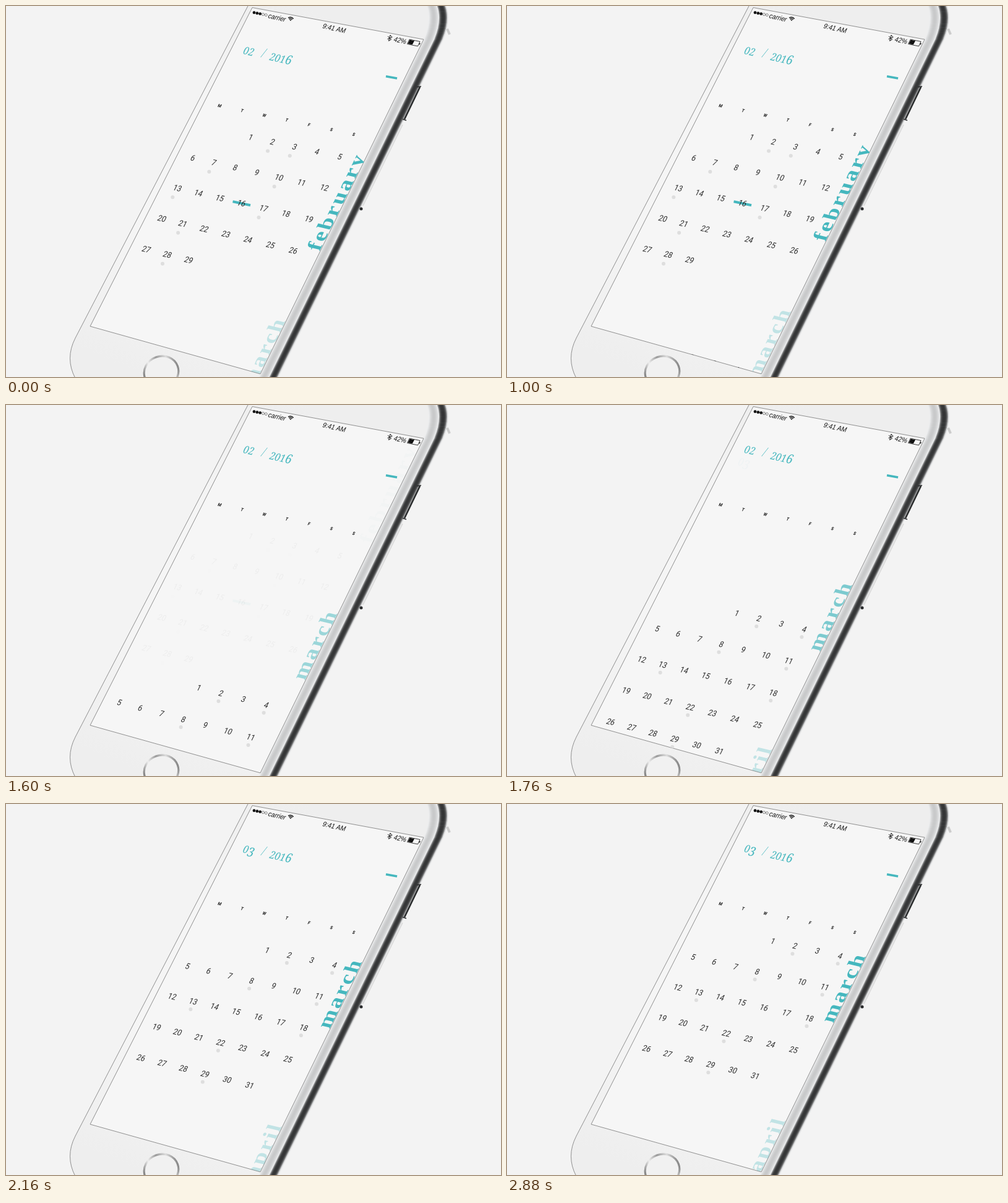
Recreate the animation shown at these times as an HTML page with a canvas. Size 800x600 px, loop 2920 ms.

```html
<!DOCTYPE html>
<html lang="en">
<head>
<meta charset="utf-8">
<title>Calendar</title>
<style>
html, body { margin: 0; width: 100%; height: 100%; overflow: hidden; background: #f3f3f3; }
canvas { display: block; }
</style>
</head>
<body>
<canvas id="stage" width="800" height="600"></canvas>
<script>
const ctx = document.getElementById('stage').getContext('2d');
const LOOP = 2920, TEAL = '#45b7be';
const SANS = 'Roboto, sans-serif', STATUS = '"Liberation Sans", Arial, sans-serif';
const SERIF = '"Liberation Serif", "Times New Roman", serif', NUMERALS = '"Noto Serif", serif';

const ramp = (t, start, end) => Math.min(1, Math.max(0, (t - start) / (end - start)));

// Like cubic-bezier(x1, 0, x2, 1) between two times.
function ease(t, start, end, x1, x2) {
  const x = ramp(t, start, end);
  let low = 0, high = 1, p = .5;
  for (let i = 0; i < 24; i++) {
    p = (low + high) / 2;
    const q = 1 - p;
    if (3 * q * q * p * x1 + 3 * q * p * p * x2 + p ** 3 < x) low = p;
    else high = p;
  }
  return p * p * (3 - 2 * p);
}

const edgeX = y => 675 - (y - 54) * .488;
const columnX = i => 33.6 * i + .3 * i * i;
const gridPoint = (u, row) =>
  [327.2 + u - 25.1 * row, 197 + 48.3 * row + .2 * row * row + u * (.219 + .008 * row)];

function paint(fill, stroke, width = 1) {
  if (fill) { ctx.fillStyle = fill; ctx.fill(); }
  if (stroke) { ctx.strokeStyle = stroke; ctx.lineWidth = width; ctx.stroke(); }
}
function shape(points, fill, stroke, width, close = true) {
  ctx.beginPath();
  points.forEach(p => ctx.lineTo(...p));
  if (close) ctx.closePath();
  paint(fill, stroke, width);
}
const line = (x1, y1, x2, y2, color, width) => shape([[x1, y1], [x2, y2]], null, color, width, false);
function disc(x, y, r, fill, stroke, width) {
  ctx.beginPath();
  ctx.arc(x, y, r, 0, 7);
  paint(fill, stroke, width);
}
function gradient(x1, y1, x2, y2, ...colors) {
  const g = ctx.createLinearGradient(x1, y1, x2, y2);
  colors.forEach((c, i) => g.addColorStop(i / (colors.length - 1), c));
  return g;
}
// Text lying in the plane of the screen.
function label(text, x, y, font, color, align = 'left') {
  ctx.save();
  ctx.transform(.82, .19, -.43, .88, x, y);
  ctx.font = font;
  ctx.fillStyle = color;
  ctx.textAlign = align;
  ctx.fillText(text, 0, 0);
  ctx.restore();
}
function faded(alpha, draw) {
  if (alpha <= 0) return;
  ctx.save();
  ctx.globalAlpha = Math.min(1, alpha);
  draw();
  ctx.restore();
}

function drawBody() {
  ctx.beginPath();
  ctx.moveTo(392, -2);
  ctx.lineTo(112, 537);
  ctx.quadraticCurveTo(95, 570, 112, 602);
  ctx.lineTo(434, 602);
  ctx.lineTo(702, 54);
  ctx.quadraticCurveTo(715, 20, 704, -2);
  paint(gradient(480, 0, 230, 600, '#eeeeee', '#f5f5f5', '#f5f5f5', '#eeeeee'), '#777', .8);

  // Metal side: a soft pale rim, then a dark band that brightens outwards.
  for (let offset = 1; offset < 32; offset++) {
    const shade = offset < 18
      ? 245 - 45 * Math.sin(Math.PI * offset / 18)
      : 52 + 170 * (Math.abs(offset - 24) / 7) ** 3;
    ctx.beginPath();
    ctx.moveTo(678 + offset, -4);
    ctx.quadraticCurveTo(689 + offset, 20, 675 + offset, 54);
    ctx.lineTo(edgeX(610) + offset, 610);
    paint(null, `rgb(${shade}, ${shade + 1}, ${shade + 2})`, 1.6);
  }
  line(713, 37, 717, 46, '#cccccc', 4);
  line(669, 131, 644, 183, '#292b2c', 2.6);
  line(664, 131, 671, 130, '#292b2c', 1.5);
  line(641, 183, 647, 185, '#292b2c', 1.5);
  line(641, 192, 577, 323, '#d8d8d8', 1.5);
  disc(574, 328, 2.5, '#292b2c');

  ctx.beginPath();
  ctx.ellipse(251, 592, 28, 25.5, -.35, 0, 7);
  paint('#f1f1f1', gradient(222, 600, 279, 578, '#777', '#eeeeee', '#999', '#dddddd', '#777'), 3.2);
}

function drawStatusBar() {
  for (let i = 0; i < 5; i++)
    disc(401 + i * 4.8, 10.7 + i * .95, i < 3 ? 2.4 : 2, i < 3 && '#111', i > 2 && '#333', .6);
  const font = '12px ' + STATUS;
  label('carrier', 422.5, 19, font, '#111');
  label('9:41 AM', 510.5, 35.5, font, '#111');
  label('42%', 625.5, 57, font, '#111');
  for (let r = 1.5; r < 7; r += 2.4) {
    ctx.beginPath();
    ctx.arc(459.5, 24.5, r, -2.15, -.65);
    paint(null, '#111', 1.5);
  }
  shape([[617, 49], [622.5, 54], [618.5, 56.5], [621, 47], [624, 50.5], [616.5, 53.5]],
    null, '#111', 1, false);
  shape([[652, 54], [669, 57.5], [665.5, 65], [648.5, 61.5]], null, '#222', .9);
  shape([[652.5, 54.8], [660, 56.3], [656.7, 62.6], [649.4, 61.1]], '#111');
  line(669.2, 60, 668, 62.5, '#222', 1.5);
}

// Old-style figures: 3 hangs below the line, 6 rises above the rest.
function oldStyle(text, x, y) {
  for (const ch of text) {
    const size = ch === '3' || ch === '6' ? 22 : 18, drop = ch === '3' ? 4 : 0;
    label(ch, x - drop * .43, y + drop * .88, size + 'px ' + NUMERALS, TEAL);
    x += size * .56 * .82;
    y += size * .56 * .19;
  }
}

function drawHeader(t) {
  const rolled = ease(t, 1700, 2280, .6, .4), ahead = 1 - rolled;
  faded(1 - rolled * 2.2, () => oldStyle('02', 381.5 + rolled * 10, 77 - rolled * 20));
  faded(rolled * 3.2, () => oldStyle('03', 381.5 - ahead * 10, 77 + ahead * 20));
  line(411.5, 83, 422.5, 69, TEAL, .8);
  oldStyle('2016', 424, 87);
  line(614, 113.7, 632, 117, TEAL, 3.6);
  [...'MTWTFSS'].forEach((day, i) => {
    const [x, y] = gridPoint(36.1 * i, -.72);
    label(day, x - 1, y + 1.3, 'bold 7.5px ' + SANS, '#111', 'center');
  });
}

const february = { first: 2, count: 29, events: [2, 3, 7, 10, 13, 17, 21, 28], today: 16, dx: -7.7, dy: 14.8 };
const march = { first: 3, count: 31, events: [2, 4, 8, 11, 13, 18, 22, 29], dx: -4, dy: 12.8 };

function drawDays(month, shift) {
  for (let day = 1; day <= month.count; day++) {
    const cell = month.first + day - 1;
    const [x, y] = gridPoint(columnX(cell % 7), Math.floor(cell / 7) + shift);
    if (month.events.includes(day)) disc(x + month.dx, y + month.dy, 3, '#dedede');
    if (day === month.today) line(x - 14, y - 2.5, x + 14.5, y + 3.5, TEAL, 4);
    label(day, x - 2, y + 4.4, '14px ' + SANS, '#2b2b2b', 'center');
  }
}

function drawMonthName(name, y, alpha) {
  faded(alpha, () => {
    ctx.transform(.4386, -.8987, .8, .19, edgeX(y) - 1, y);
    ctx.font = 'bold 39px ' + SERIF;
    ctx.letterSpacing = '3.3px';
    ctx.fillStyle = TEAL;
    ctx.fillText(name, 0, 0);
  });
}

function draw(t) {
  ctx.fillStyle = '#f3f3f3';
  ctx.fillRect(0, 0, 800, 600);
  drawBody();
  const screen = [[398, 2.5], [675, 54], [411, 595], [136, 518]];
  shape(screen, '#f6f6f6', '#777', .8);

  ctx.save();
  shape(screen);
  ctx.clip();
  drawStatusBar();
  drawHeader(t);
  faded(1 - ramp(t, 1180, 1620), () => drawDays(february, 0));
  drawDays(march, .04 + 7 * (1 - ease(t, 300, 2640, .957, .298)));
  const rail = 263 * ease(t, 300, 2700, .866, .174);
  drawMonthName('february', 397 - rail, 1 - ramp(t, 1220, 1610));
  drawMonthName('march', 618 - rail, .3 + .7 * ramp(t, 1400, 2050));
  drawMonthName('april', 859 - rail, .3);
  ctx.restore();
}

function tick() {
  draw(performance.now() % LOOP);
  requestAnimationFrame(tick);
}
tick();
</script>
</body>
</html>
```
